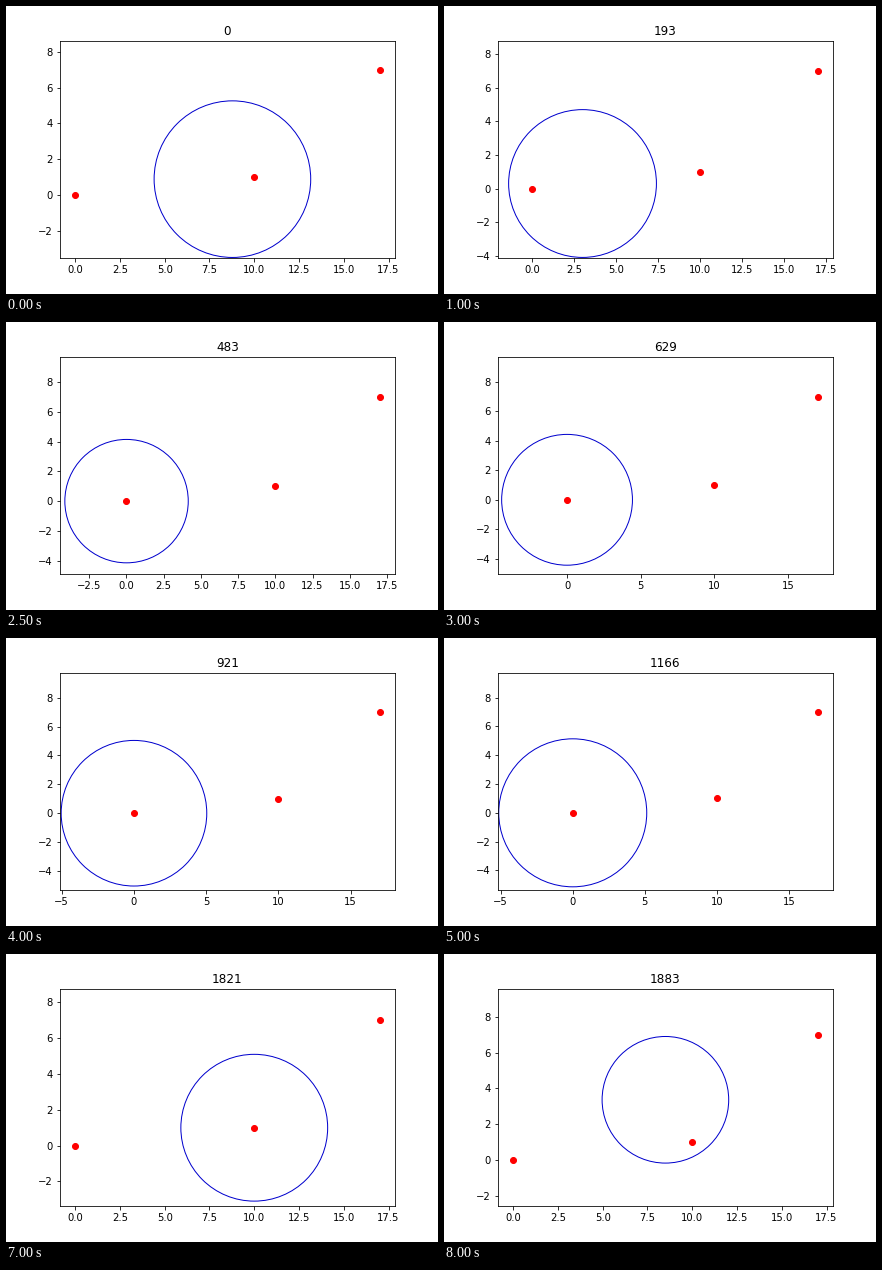
Animation of 432 by 288 pixels, one loop 8.5 s. Source, as a matplotlib script:

```python
import numpy as np
import matplotlib.pyplot as plt
from matplotlib.animation import FuncAnimation
from matplotlib.patches import Circle

FRAMES = 17
POINTS = np.array([(0, 0), (10, 1), (17, 7)])
START = np.array([8.78, 0.89])
END = np.array([8.5, 3.36])

# key poses between which the counter and the ring's pixel radius run evenly
KEY_FRAMES = [0, 3, 5, 8, 10, 14, 16]
KEY_COUNTS = [0, 290, 483, 921, 1166, 1821, 1883]
KEY_RADII = [78.3, 71.7, 61.7, 72.8, 74, 73.4, 63.3]

plt.rcParams["font.family"] = "DejaVu Sans"
fig, ax = plt.subplots(figsize=(6, 4), dpi=72)
fig.subplots_adjust(left=0.125, right=0.9, bottom=0.125, top=0.88)
SIZE = ax.get_position().size * (432, 288)
# pixels per unit when only the points, with 5% margins, fill the axes
BASE_SCALE = SIZE / (1.1 * np.ptp(POINTS, axis=0))

ax.plot(*POINTS.T, "ro", markersize=6)
ring = ax.add_artist(Circle((0, 0), 1, fill=False, edgecolor="mediumblue",
                            linewidth=1))
title = ax.set_title("0", fontsize=12)


def center_at(i):
    """Slide onto the first point, then jump to the others and to the end."""
    if i <= 10:
        return START * np.exp(-(i / 1.93) ** 2)
    if i < FRAMES - 2:
        return POINTS[1]
    return POINTS[2] if i == FRAMES - 2 else END


def fit_view(center, radius):
    """Hold points and ring with equal axes; return pixels per unit."""
    reach = radius / BASE_SCALE
    low = np.minimum(POINTS.min(axis=0), center - reach)
    high = np.maximum(POINTS.max(axis=0), center + reach)
    scale = SIZE[0] / (1.1 * (high[0] - low[0]))
    middle, half = (low + high) / 2, SIZE / scale / 2
    ax.set_xlim(middle[0] - half[0], middle[0] + half[0])
    ax.set_ylim(middle[1] - half[1], middle[1] + half[1])
    return scale


def draw(i):
    center = center_at(i)
    radius = np.interp(i, KEY_FRAMES, KEY_RADII)
    scale = fit_view(center, radius)
    ring.set_center(center)
    ring.set_radius(radius / scale)
    title.set_text(f"{np.interp(i, KEY_FRAMES, KEY_COUNTS):.0f}")
    return ring, title


anim = FuncAnimation(fig, draw, frames=FRAMES, init_func=lambda: draw(0),
                     interval=500, repeat=True, repeat_delay=0, blit=False)
plt.show()
```
